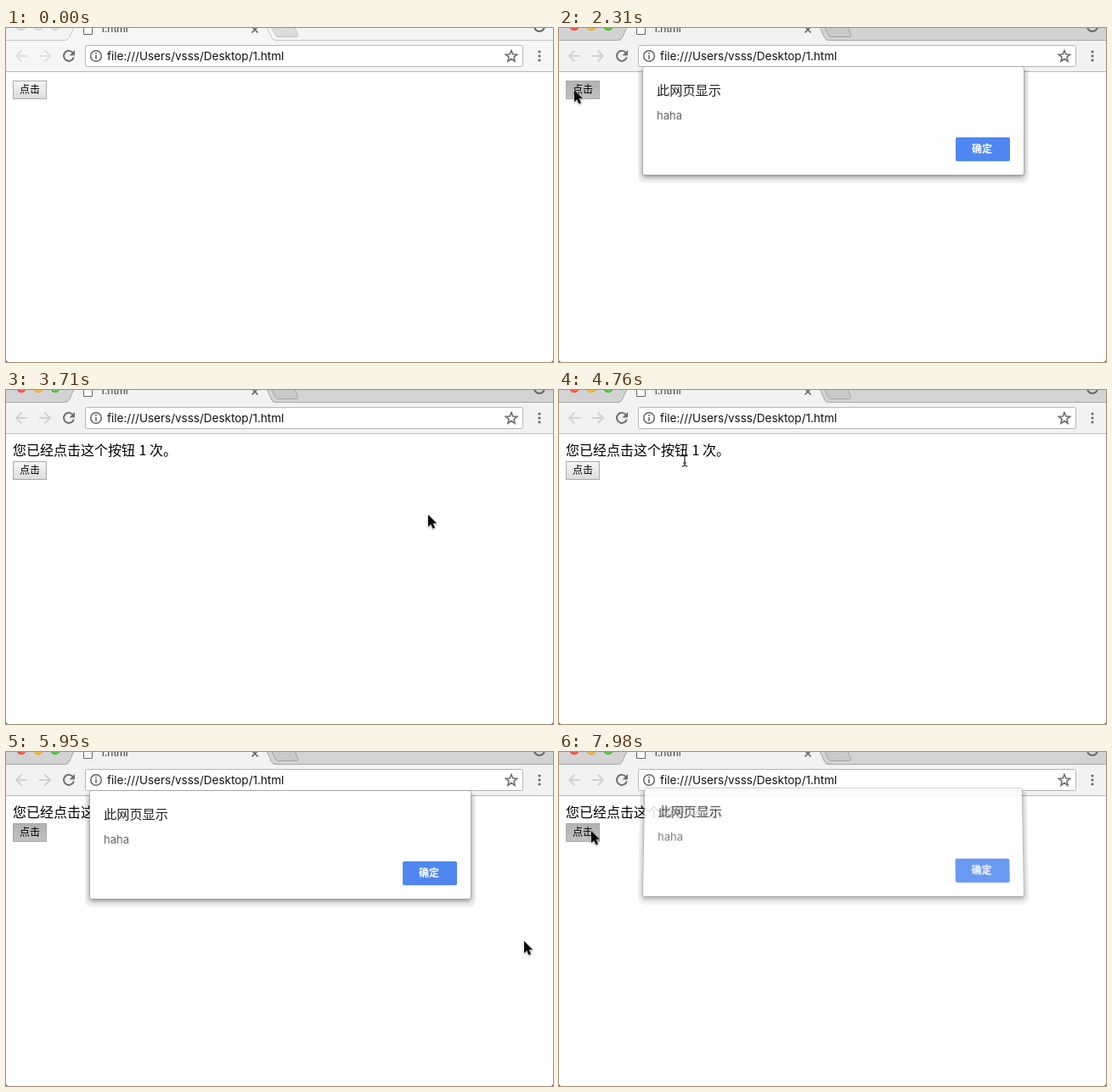
Animation of 644 by 394 pixels, one loop 8 s. Source, as an HTML page:

```html
<!DOCTYPE html>
<html lang="zh-CN">
<head>
<meta charset="utf-8">
<style>
html, body { margin: 0; width: 100%; height: 100%; overflow: hidden; background: #fff; }
svg { position: absolute; left: 0; top: 0; width: 644px; height: 394px; overflow: hidden; }
text { font-family: "Noto Sans CJK SC", "Noto Sans CJK", sans-serif; }
.ui { font-family: Inter, Roboto, sans-serif; }
#dialog { transform-origin: 323px 173px; overflow: visible; }
</style>
</head>
<body>
<svg viewBox="0 0 644 394">
  <defs>
    <linearGradient id="up" x2="0" y2="1"><stop stop-color="#f6f6f6"/><stop offset="1" stop-color="#dcdcdc"/></linearGradient>
    <linearGradient id="down" x2="0" y2="1"><stop stop-color="#b2b2b2"/><stop offset="1" stop-color="#c1c1c1"/></linearGradient>
  </defs>
  <rect width="644" height="394" fill="#fff"/>
  <rect id="strip" width="644" height="15"/>
  <rect id="bar" y="15" width="644" height="36"/>
  <path id="tab" d="M71 15Q74 14 75 11L80 0H307L312 11Q313 14 316 15Z"/>
  <path id="edge" d="M0 14.5H69Q73 14.5 74.500 11L79.500 0M307.500 0L312.500 11Q314 14.500 318 14.500H644" fill="none"/>
  <path id="plus" d="M312.500 -1L317 8Q318 10.500 321 10.500H341.500Q345 10.500 343.500 7.500L340 -1Z"/>
  <g id="lights"><circle cx="18" cy="-3"/><circle cx="38" cy="-3"/><circle cx="58" cy="-3"/></g>
  <path d="M91.500 -4V7.500H101.500V-4" fill="#fff" stroke="#666"/>
  <text class="ui" x="111" y="5" font-size="12" fill="#333">1.html</text>
  <path d="M289.500 -1.500L296.500 5.500M296.500 -1.500L289.500 5.500" stroke="#5c5c5c" stroke-width="1.500"/>
  <circle cx="628" cy="-2" r="6" fill="none" stroke="#666" stroke-width="2"/>
  <path d="M0 51.500H644" stroke="#b8b8b8"/>
  <path id="nav" d="M25 33H12.500M18.500 26.500L12 33L18.500 39.500M39 33H51.500M45.500 26.500L52 33L45.500 39.500" fill="none" stroke-width="1.800"/>
  <path d="M79 29.500A6 6 0 1 0 79.800 34.500" fill="none" stroke="#707070" stroke-width="2"/>
  <path d="M81 26V32.500H74.500Z" fill="#707070"/>
  <rect x="93.500" y="20.500" width="515" height="25" rx="2" fill="#fff" stroke="#b6b6b6"/>
  <circle cx="106" cy="33" r="6.300" fill="none" stroke="#616161" stroke-width="1.500"/>
  <path d="M106 29V30.700M106 32V36.800" stroke="#616161" stroke-width="1.600"/>
  <text class="ui" x="119" y="38" font-size="13.500" fill="#111">file:///Users/vsss/Desktop/1.html</text>
  <path id="star" fill="none" stroke="#6a6a6a" stroke-width="1.500"/>
  <g fill="#6a6a6a"><circle cx="628" cy="28" r="1.600"/><circle cx="628" cy="33" r="1.600"/><circle cx="628" cy="38" r="1.600"/></g>
  <g id="note" font-size="16" fill="#000">
    <text x="8" y="77">您已经点击这个按钮</text><text id="count" x="156.500" y="77"></text><text id="unit" y="77">次。</text>
  </g>
  <g id="button">
    <rect id="face" x="8.500" y="62.500" width="39" height="21" stroke="#a9a9a9"/>
    <text x="16" y="77" font-size="12" fill="#000">点击</text>
  </g>
  <path d="M0 391V394H3Q0 394 0 391M644 391V394H641Q644 394 644 391" fill="#444"/>
</svg>

<svg id="dialog" viewBox="0 0 644 394">
  <defs><filter id="soft" x="-10%" y="-20%" width="120%" height="150%"><feGaussianBlur stdDeviation="2.500"/></filter></defs>
  <path d="M93 50H553V174Q553 183 544 183H102Q93 183 93 174Z" fill="#000" opacity=".06"/>
  <rect x="98" y="49" width="450" height="127" rx="4" fill="#000" opacity=".38" filter="url(#soft)"/>
  <rect x="98.500" y="45.500" width="449" height="128" rx="2.500" fill="#fff" stroke="#000" stroke-opacity=".22"/>
  <text x="115" y="79" font-size="15.200" fill="#222">此网页显示</text>
  <text class="ui" x="115" y="108" font-size="13" fill="#666">haha</text>
  <rect x="467" y="129.500" width="64" height="28" rx="2" fill="#000" opacity=".2"/>
  <rect id="ok" x="467" y="129" width="64" height="28" rx="2"/>
  <text x="486" y="147.300" font-size="12" font-weight="700" fill="#fff">确定</text>
</svg>

<svg id="pointer" viewBox="0 0 644 394">
  <path id="arrow" d="M0 0V14.200L3.200 11.300L5.500 16.500L8 15.400L5.800 10.300H10.200Z" fill="#000" stroke="#fff" stroke-width="1" paint-order="stroke" stroke-linejoin="round" style="filter:drop-shadow(0 1px 1px rgba(0,0,0,.35))"/>
  <path id="beam" d="M-3.500 -7Q0 -7 0 -4.500Q0 -7 3.500 -7M0 -5V5M-3.500 7Q0 7 0 4.500Q0 7 3.500 7M-2 3H2" fill="none" stroke="#222" stroke-width="1.200"/>
</svg>

<script>
const LOOP = 8000, STEP = 70, FADE = 160, FOCUS = 560;
const $ = id => document.getElementById(id);
const set = (id, attrs) => { for (const k in attrs) $(id).setAttribute(k, attrs[k]); };
const clamp = v => Math.max(0, Math.min(1, v));

// One entry per click on the page button
const clicks = [
  { press: 1960, open: 2050, close: 3400 },
  { press: 5250, open: 5290, close: 6592 },
  { press: 7770, open: 7844, close: 9000 }
];

// Pointer stops: time, x, y
const stops = [
  [0, 660, 335], [70, 634, 325], [700, 204, 205], [910, 204, 205],
  [1120, 97, 72], [1190, 97, 72], [1400, 16, 71], [1540, 16, 71],
  [1820, 12, 66], [1960, 18, 73], [2310, 18, 73], [2870, 501, 152],
  [3360, 497, 147], [3710, 497, 147], [4060, 148, 83], [4760, 148, 83],
  [5180, 20, 94], [5530, 20, 94], [5950, 610, 223], [6020, 610, 223],
  [6370, 502, 145], [6650, 504, 145], [6720, 508, 145], [7140, 150, 122],
  [7210, 150, 122], [7700, 38, 93], [8000, 38, 93]
];

function pointerAt(t) {
  const i = Math.max(1, stops.findIndex(s => s[0] >= t));
  const [t0, x0, y0] = stops[i - 1], [t1, x1, y1] = stops[i];
  const u = clamp((t - t0) / (t1 - t0)), e = u * u * (3 - 2 * u);
  return [x0 + (x1 - x0) * e, y0 + (y1 - y0) * e];
}

function drawWindow(active) {
  const pick = (on, off) => active ? on : off;
  set("strip", { fill: pick("#d3d3d3", "#f4f4f4") });
  set("bar", { fill: pick("#f2f2f2", "#f6f6f6") });
  set("tab", { fill: pick("#f2f2f2", "#f6f6f6") });
  set("edge", { stroke: pick("#a8a8a8", "#c4c4c4") });
  set("plus", { fill: pick("#c9c9c9", "#dcdcdc"), stroke: pick("#a4a4a4", "#c2c2c2") });
  set("nav", { stroke: pick("#d2d2d2", "#dedede") });
  const colors = ["#f25e57", "#f9bd3e", "#5bc84f"], rims = ["#dd4a43", "#dea032", "#3fae38"];
  [...$("lights").children].forEach((c, i) => {
    c.setAttribute("r", 5.7);
    c.setAttribute("fill", pick(colors[i], "#dfdfdf"));
    c.setAttribute("stroke", pick(rims[i], "#d0d0d0"));
  });
}

function drawPage(count, pressed) {
  set("note", { visibility: count ? "visible" : "hidden" });
  $("count").textContent = count;
  set("unit", { x: count > 1 ? 171 : 169 });
  set("button", { transform: `translate(0 ${count ? 22 : 0})` });
  set("face", { fill: `url(#${pressed ? "down" : "up"})` });
}

// hidden: 0 fully shown, 1 gone; the sheet lifts and its top edge tilts away
function drawDialog(hidden, hover) {
  const k = 0.068 * hidden, s = $("dialog").style;
  s.display = hidden < 1 ? "block" : "none";
  s.opacity = 1 - hidden;
  s.transform = hidden ? `translateY(${-20 * hidden}px) matrix3d(1,0,0,0, 0,${1 + k},0,${-k / 127}, 0,0,1,0, 0,0,0,1)` : "none";
  set("ok", { fill: hover ? "#5583df" : "#4f86f0" });
}

function draw(time) {
  const t = Math.floor(time / STEP) * STEP;
  const [x, y] = pointerAt(t);
  const count = clicks.filter(c => t >= c.close).length;
  const pressed = clicks.some(c => t >= c.press && t < c.close);
  const shown = Math.max(...clicks.map(c => Math.min(clamp((t - c.open) / FADE), 1 - clamp((t - c.close) / FADE))));
  const hover = x > 467 && x < 531 && y > 129 && y < 157;
  const onText = count > 0 && !shown && x < 200 && y > 62 && y < 84;
  drawWindow(t >= FOCUS);
  drawPage(count, pressed);
  drawDialog(1 - shown, hover && !count);
  const move = `translate(${Math.round(x)} ${Math.round(y)})`;
  set("arrow", { transform: move, visibility: t && !onText ? "visible" : "hidden" });
  set("beam", { transform: move, visibility: onText ? "visible" : "hidden" });
}

set("star", { d: "M" + Array.from({ length: 10 }, (_, i) => {
  const a = i * Math.PI / 5 - Math.PI / 2, r = i % 2 ? 3 : 7;
  return (595 + r * Math.cos(a)).toFixed(1) + " " + (33.5 + r * Math.sin(a)).toFixed(1);
}).join("L") + "Z" });

function tick(now) {
  draw(now % LOOP);
  requestAnimationFrame(tick);
}
draw(0);
requestAnimationFrame(tick);
</script>
</body>
</html>
```
